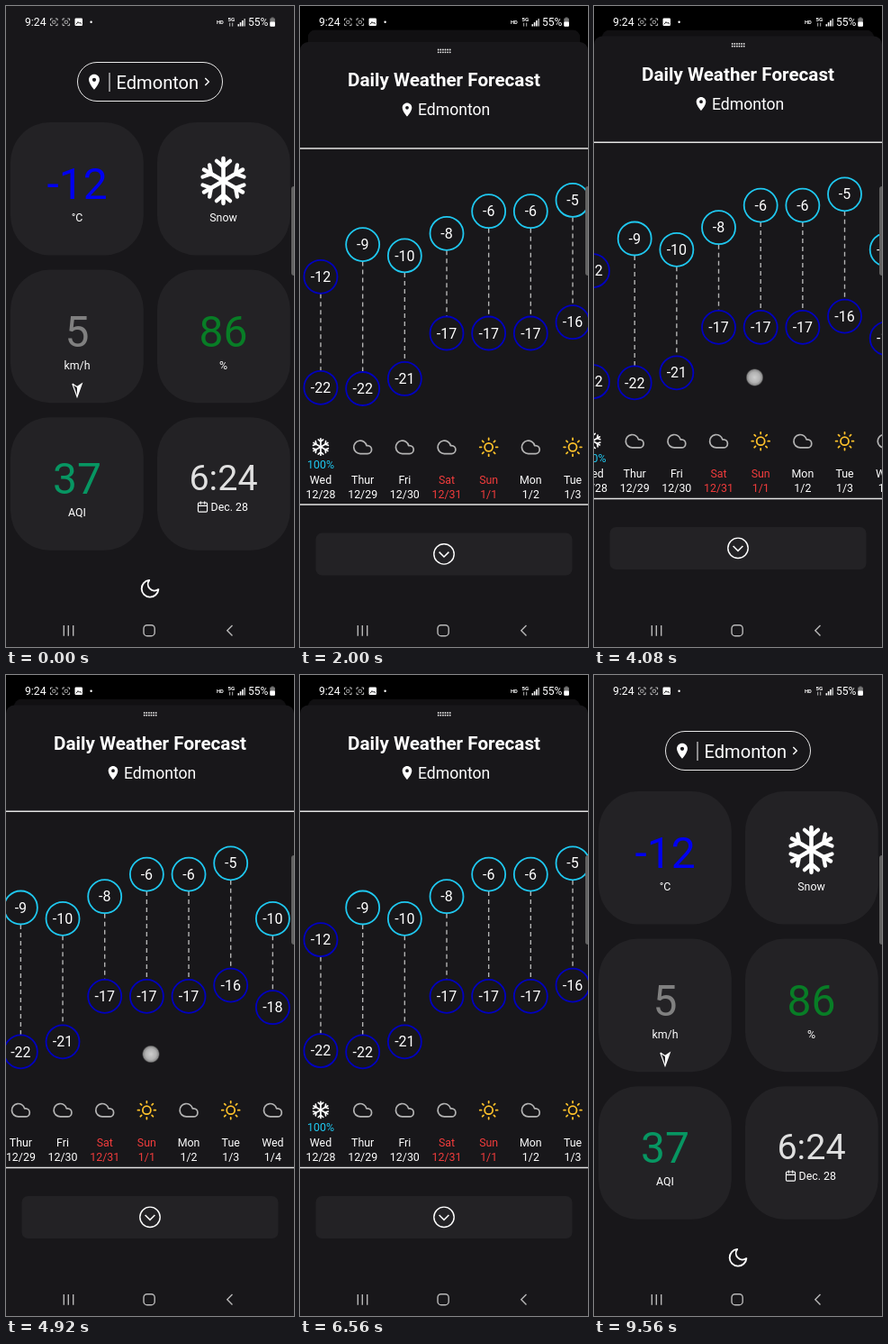
Animation, 320 px wide and 711 px high, one loop 9.88 s. Source, as an HTML page with a canvas:

```html
<!DOCTYPE html>
<html lang="en">
<head>
<meta charset="utf-8">
<title>Weather</title>
<style>
html, body { margin: 0; width: 100%; height: 100%; overflow: hidden; background: #000; }
canvas { display: block; width: 320px; height: 711px; }
</style>
</head>
<body>
<canvas id="stage"></canvas>
<script>
const W = 320, H = 711, NAV = 674, LOOP = 9880;
const TOP = 33.5, TRAVEL = NAV - TOP, MAX_SCROLL = 53.3, COL = W / 6.857;
const BG = '#18171a', CARD = '#232225', WHITE = '#fff', CYAN = '#1fc8f0', BLUE = '#0000c0', RED = '#f23c3c';

const canvas = document.getElementById('stage');
const c = canvas.getContext('2d');
const dpr = window.devicePixelRatio || 1;
canvas.width = W * dpr;
canvas.height = H * dpr;

// Icons on a 24 unit grid
const PIN = new Path2D('M12 2C8.13 2 5 5.13 5 9c0 5.25 7 13 7 13s7-7.75 7-13c0-3.87-3.13-7-7-7zm0 9.5a2.5 2.5 0 0 1 0-5 2.5 2.5 0 0 1 0 5z');
const MOON = new Path2D('M21 12.79A9 9 0 1 1 11.21 3 7 7 0 0 0 21 12.79z');
const CLOUD = new Path2D('M18 10h-1.26A8 8 0 1 0 9 20h9a5 5 0 0 0 0-10z');
const SUN = new Path2D('M17 12a5 5 0 1 1-10 0 5 5 0 1 1 10 0zM12 1v2M12 21v2M4.22 4.22l1.42 1.42M18.36 18.36l1.42 1.42M1 12h2M21 12h2M4.22 19.78l1.42-1.42M18.36 5.64l1.42-1.42');
const CALENDAR = new Path2D('M5 4h14a2 2 0 0 1 2 2v14a2 2 0 0 1-2 2H5a2 2 0 0 1-2-2V6a2 2 0 0 1 2-2zM16 2v4M8 2v4M3 10h18');

const DAYS = [
  ['Wed', '12/28', -11.9, -21.9, 'snow'],
  ['Thur', '12/29', -9, -22, 'cloud'],
  ['Fri', '12/30', -10, -21.1, 'cloud'],
  ['Sat', '12/31', -8, -17, 'cloud'],
  ['Sun', '1/1', -6, -17, 'sun'],
  ['Mon', '1/2', -6, -17, 'cloud'],
  ['Tue', '1/3', -5, -16, 'sun'],
  ['Wed', '1/4', -10, -18, 'cloud']
];

const clamp = (v, lo, hi) => Math.min(hi, Math.max(lo, v));
const ease = u => u * u * (3 - 2 * u);
const span = (t, from, to) => clamp((t - from) / (to - from), 0, 1);

// Critically damped spring from x to 0, moving towards 0 at speed v
const spring = (x, v, w, t) => (x + (w * x - v) * t) * Math.exp(-w * t);

function text(s, x, y, size, color = WHITE, align = 'center', weight = 400) {
  c.font = `${weight} ${size}px Roboto, sans-serif`;
  c.textAlign = align;
  c.fillStyle = color;
  c.fillText(s, x, y);
}

function box(x, y, w, h, r, color) {
  c.beginPath();
  c.roundRect(x, y, w, h, r);
  c.fillStyle = color;
  c.fill();
}

function frame(x, y, w, h, r, color, width) {
  c.beginPath();
  c.roundRect(x, y, w, h, r);
  c.strokeStyle = color;
  c.lineWidth = width;
  c.stroke();
}

function line(points, color = WHITE, width = 1) {
  c.beginPath();
  points.forEach(([x, y]) => c.lineTo(x, y));
  c.strokeStyle = color;
  c.lineWidth = width;
  c.stroke();
}

function ring(x, y, r, color, width) {
  c.beginPath();
  c.arc(x, y, r, 0, 7);
  c.strokeStyle = color;
  c.lineWidth = width;
  c.stroke();
}

function icon(path, x, y, scale, color, width = 0) {
  c.save();
  c.translate(x, y);
  c.scale(scale, scale);
  c.translate(-12, -12);
  c.lineCap = c.lineJoin = 'round';
  c.lineWidth = width;
  c.strokeStyle = c.fillStyle = color;
  if (width) c.stroke(path); else c.fill(path, 'evenodd');
  c.restore();
}

function snowflake(x, y, r) {
  c.save();
  c.translate(x, y);
  c.lineCap = 'round';
  for (let i = 0; i < 6; i++) {
    line([[0, 0], [0, -r * .92]], WHITE, r * .17);
    line([[-r * .28, -r * .82], [0, -r * .58], [r * .28, -r * .82]], WHITE, r * .16);
    c.rotate(Math.PI / 3);
  }
  c.restore();
}

function home(p) {
  c.save();
  c.translate(W / 2, NAV / 2 + 8 * p);
  c.scale(1 - p / 18, 1 - p / 18);
  c.translate(-W / 2, -NAV / 2);
  c.beginPath();
  c.roundRect(0, 0, W, NAV, 9 * p);
  c.clip();
  c.fillStyle = BG;
  c.fillRect(0, 0, W, NAV);

  frame(79.5, 62.5, 161, 43, 21.5, '#e8e8e8', 1);
  icon(PIN, 98, 84.3, .85, WHITE);
  line([[115, 74], [115, 95]]);
  text('Edmonton', 122.5, 91.8, 20.1, WHITE, 'left');
  line([[221.3, 80], [225.3, 84], [221.3, 88]], WHITE, 1.4);

  for (let i = 0; i < 6; i++)
    box(i % 2 ? 168 : 5, 129 + 163.6 * (i >> 1), 147.8, 147.6, 44, CARD);

  text('-12', 79, 214, 48, '#0000f0');
  text('°C', 79, 239, 12.4);
  snowflake(241.5, 194, 27);
  text('Snow', 241.5, 238.5, 12.4);
  text('5', 79, 377.5, 48, '#808080');
  text('km/h', 79, 402.5, 12.4);
  line([[73.8, 419], [79, 422.5], [84.2, 419], [79, 433.5], [73.8, 419]], WHITE, 1.2);
  c.beginPath();
  c.moveTo(79, 422.5); c.lineTo(84.2, 419); c.lineTo(79, 433.5);
  c.fillStyle = WHITE;
  c.fill();
  text('86', 241.5, 377.5, 48, '#087d26');
  text('%', 241.5, 402.5, 12.4);
  text('37', 79, 541, 48, '#079662');
  text('AQI', 79, 566, 12.4);
  text('6:24', 241.5, 537.3, 39.5, '#e0e0e0');
  icon(CALENDAR, 218.5, 555.5, .56, WHITE, 2);
  text('Dec. 28', 227.5, 560.3, 12.4, WHITE, 'left');
  icon(MOON, 160, 646.3, 1.04, WHITE, 1.8);

  c.fillStyle = `rgba(0,0,0,${.3 * p})`;
  c.fillRect(0, 0, W, NAV);
  c.restore();
}

function temperature(x, y, value) {
  ring(x, y, 18.5, value > -11 ? CYAN : BLUE, 1.8);
  text(Math.round(value), x, y + 5.6, 16);
}

function day([name, date, high, low, sky], x) {
  const yOf = deg => 208.8 - 12.3 * (deg + 5);
  c.setLineDash([5, 4]);
  line([[x, yOf(high) + 19], [x, yOf(low) - 19]], '#b4b4b4', 1.4);
  c.setLineDash([]);
  temperature(x, yOf(high), high);
  temperature(x, yOf(low), low);

  if (sky === 'snow') {
    snowflake(x, 482.4, 9.9);
    text('100%', x, 506.4, 12.4, CYAN);
  } else if (sky === 'sun') icon(SUN, x, 482.7, .9, '#fcc02a', 2);
  else icon(CLOUD, x, 482.7, .9, '#b4b4b4', 1.9);

  const color = /^S/.test(name) ? RED : WHITE;
  text(name, x, 523.2, 12.4, color);
  text(date, x, 539.4, 12.4, color);
}

function sheet(dy, scroll) {
  c.save();
  c.translate(0, dy);
  box(0, TOP, W, H, [9, 9, 0, 0], BG);
  for (let i = 0; i < 12; i++)
    box(152.8 + i % 6 * 2.6, 41 + (i > 5) * 2.8, 1.8, 1.8, .9, '#f0f0f0');
  text('Daily Weather Forecast', 160, 82.8, 20.65, WHITE, 'center', 700);
  icon(PIN, 119, 108.5, .76, WHITE);
  text('Edmonton', 131, 114.8, 17.6, WHITE, 'left');
  line([[0, 151.3], [W, 151.3]], '#e4e4e4', 1.5);
  line([[0, 546.4], [W, 546.4]], '#e4e4e4', 1.5);
  DAYS.forEach((d, i) => day(d, 23 + COL * i - scroll));
  box(17.5, 578, 285, 47, 7, CARD);
  ring(160, 601.3, 11.2, WHITE, 1.4);
  line([[154.6, 599], [160, 604.4], [165.4, 599]], WHITE, 1.5);
  c.restore();
}

function statusBar() {
  text('9:24', 21, 21.9, 12.2, WHITE, 'left');
  for (const x of [49.5, 63]) {
    c.setLineDash([2.2, 3.2, 2.2, 0]);
    frame(x, 14, 7.6, 7.6, 0, '#d0d0d0', .9);
    c.setLineDash([]);
    frame(x + 2.2, 16.3, 3.2, 3, .5, '#d0d0d0', .8);
  }
  box(76.5, 13.5, 8.5, 8.5, 1.2, WHITE);
  line([[78, 20.3], [80, 17.6], [81.3, 19.2], [82.3, 18.2], [83.7, 20.3]], '#222', 1);
  box(93.4, 16.6, 2.4, 2.4, 1.2, WHITE);

  text('HD', 234, 20.2, 5.8, WHITE, 'left', 700);
  text('5G', 246.5, 17.4, 6.2, WHITE, 'left', 700);
  line([[248.7, 18.6], [248.7, 22.6]], '#ccc', .9);
  line([[251.7, 18.6], [251.7, 22.6]], '#ccc', .9);
  for (let i = 0; i < 4; i++)
    box(257.5 + i * 2.3, 20.2 - i * 2.1, 1.6, 2.3 + i * 2.1, 0, i < 3 ? WHITE : '#aaa');
  text('55%', 269, 21.9, 12.1, WHITE, 'left');
  box(293.3, 13.5, 5.6, 9.3, 1, '#777');
  box(294.7, 12.6, 2.8, 1.2, 0, '#777');
  box(293.3, 17.6, 5.6, 5.2, 1, WHITE);
}

function navBar() {
  c.fillStyle = BG;
  c.fillRect(0, NAV, W, H - NAV);
  for (const x of [64.3, 69.3, 74.7]) line([[x, 687], [x, 698.7]], '#b8b8b8', 1.4);
  frame(153, 686.7, 12.2, 12, 3.8, '#b8b8b8', 1.4);
  line([[251.5, 687], [245.8, 692.7], [251.5, 698.4]], '#b8b8b8', 1.4);
}

function touch(x, y, alpha = 1) {
  const g = c.createRadialGradient(x, y, 0, x, y, 10);
  g.addColorStop(0, 'rgba(215,215,215,.95)');
  g.addColorStop(.6, 'rgba(190,190,190,.92)');
  g.addColorStop(.85, 'rgba(150,150,150,.9)');
  g.addColorStop(1, 'rgba(90,90,90,0)');
  c.globalAlpha = alpha;
  c.fillStyle = g;
  c.fillRect(x - 10, y - 10, 20, 20);
  c.globalAlpha = 1;
}

// Distance of the sheet below its open place
function sheetOffset(t) {
  if (t < 1200 || t >= 8720) return TRAVEL;
  if (t < 2040) return spring(TRAVEL, 0, .00825, t - 1200);
  if (t < 7960) return 0;
  if (t < 8200) return 226 * span(t, 7960, 8200) ** 1.3;
  return TRAVEL - spring(TRAVEL - 226, 1.2, .012, t - 8200);
}

function draw(t) {
  const dy = sheetOffset(t);
  const left = 100 * ease(span(t, 3760, 4600));
  const right = 90 * ease(span(t, 4920, 5880));
  const scroll = clamp(left - 8, 0, MAX_SCROLL) - clamp(right - 8, 0, MAX_SCROLL);

  c.setTransform(dpr, 0, 0, dpr, 0, 0);
  c.fillStyle = '#000';
  c.fillRect(0, 0, W, H);
  home(1 - dy / TRAVEL);
  if (dy < TRAVEL) sheet(dy, scroll);
  navBar();
  statusBar();
  box(317, 200, 6, 99, 3, '#626262');

  if (t >= 3760 && t < 4600) touch(211 - left, 412);
  if (t >= 4920 && t < 5880) touch(161 + right, 420.5);
  if (t >= 7960 && t < 8240) touch(169, 368 + dy, 1 - .65 * span(t, 8120, 8200));
}

function tick() {
  const t = performance.now() % LOOP;
  draw(Math.floor(t / 40) * 40);
  requestAnimationFrame(tick);
}
tick();
</script>
</body>
</html>
```
